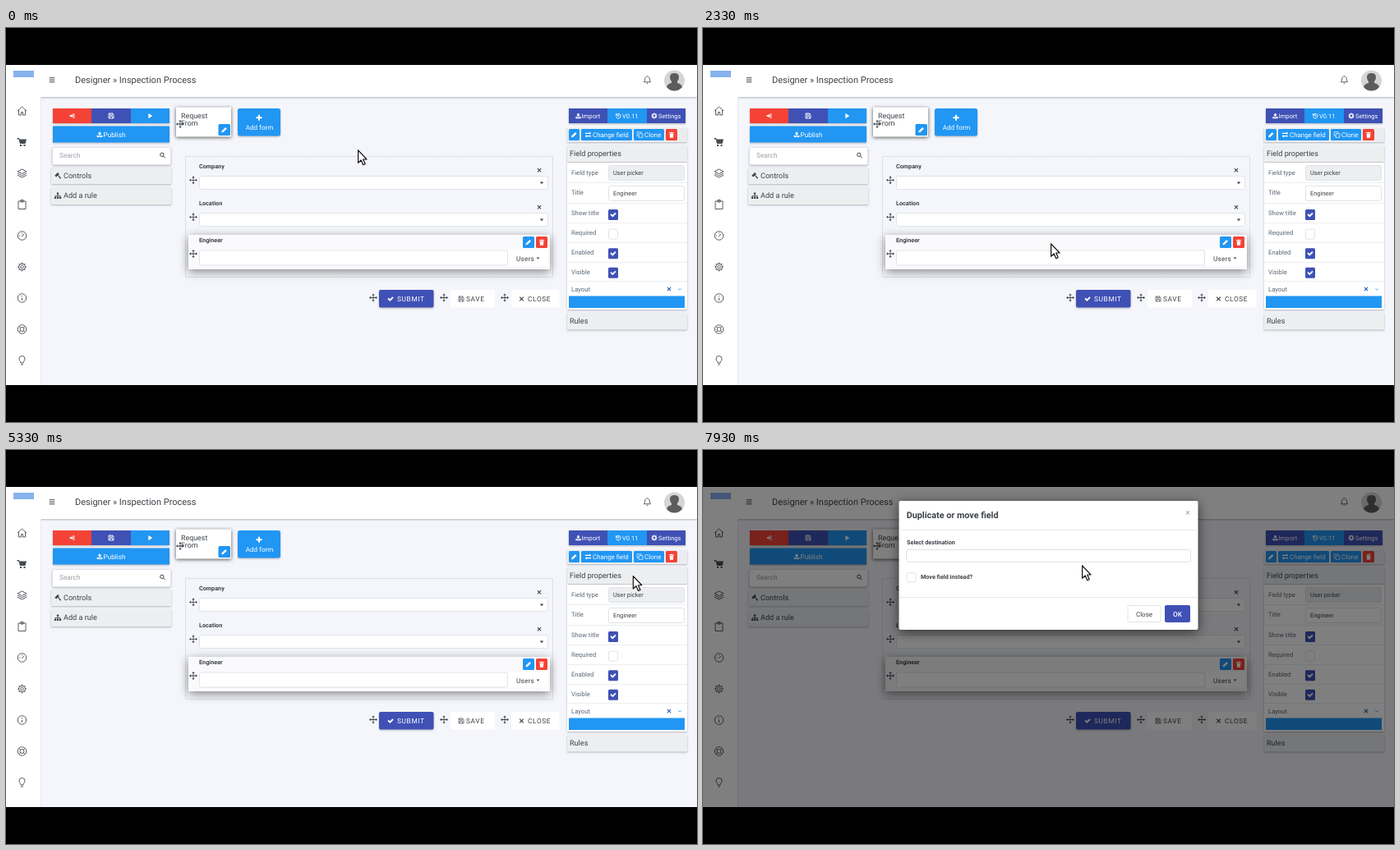
Recreate the animation shown at these times as an HTML page. Size 841 px wide and 480 px high, loop 8000 ms.

```html
<!DOCTYPE html>
<html lang="en">
<head>
<meta charset="utf-8">
<title>Form designer</title>
<style>
html, body { margin: 0; width: 100%; height: 100%; overflow: hidden; background: #000; }
svg { display: block; width: 841px; height: 480px; font-family: Roboto, sans-serif; text-rendering: geometricPrecision; }
text { white-space: pre; }
.low { filter: drop-shadow(0 1px 1px #0004); }
.mid { filter: drop-shadow(0 1px 2px #000a); }
.lift { filter: drop-shadow(0 3px 6px #0007); }
.hover { filter: drop-shadow(0 1px 1.5px #0007); }
.modal { filter: drop-shadow(0 3px 7px #0009); }
</style>
</head>
<body>
<svg id="stage" viewBox="0 0 841 480"></svg>
<script>
const BLUE = '#2196f3', INDIGO = '#3f51b5', RED = '#f44336', INK = '#3c4248', LABEL = '#596674', BAR = '#eceef0';
const ring = r => `M${12 + r} 12a${r} ${r} 0 1 1-${2 * r} 0a${r} ${r} 0 1 1 ${2 * r} 0`;
const teeth = 'M12 1v4M12 19v4M1 12h4M19 12h4M4 4l3 3M17 17l3 3M20 4l-3 3M7 17l-3 3';

// Icons live in a 24 x 24 box.
const solid = {
  menu: 'M2 3h20v3H2zM2 10.5h20v3H2zM2 18h20v3H2z',
  play: 'M5 2l16 10L5 22z',
  exit: 'M3 9h7V5l7 7-7 7v-4H3zM15 3h6v18h-6v-3h3V6h-3z',
  upload: 'M12 2l7 7h-4v7H9V9H5zM2 15h5v3h10v-3h5v7H2z',
  download: 'M9 2h6v6h4l-7 8-7-8h4zM2 15h5l5 4 5-4h5v7H2z',
  gavel: 'M12 1l5 5-10 10-5-5zM12 11l2-2 9 10-3 3z',
  tree: 'M9 2h6v6H9zM1 16h6v6H1zM9 16h6v6H9zM17 16h6v6h-6zM11 8h2v3h8v5h-2v-3h-6v3h-2v-3H5v3H3v-5h8z',
  move: 'M12 0l4 5h-3v6h6V8l5 4-5 4v-3h-6v6h3l-4 5-4-5h3v-6H5v3L0 12l5-4v3h6V5H8z',
  plus: 'M9.5 3h5v6.5H21v5h-6.5V21h-5v-6.5H3v-5h6.5z',
  pencil: 'M2 22l1-6L16 3l5 5L8 21z',
  cross: 'M5 2l7 7 7-7 3 3-7 7 7 7-3 3-7-7-7 7-3-3 7-7-7-7z',
  caret: 'M3 7h18l-9 11z',
  trash: 'M3 4h6V2h6v2h6v3H3zM5 8h14l-1 15H6z',
  check: 'M1 12l4-4 5 5L19 4l4 4-13 13z',
  swap: 'M1 5h16V1l6 6-6 5V9H1zM23 15H7v-3l-6 5 6 6v-4h16z',
  cart: 'M0 2h5l1 3h17l-3 11H7L4 5H0zM7 18h4v4H7zM16 18h4v4h-4z'
};
const line = {
  save: 'M3 3h14l4 4v14H3zM7 3v6h9V3M7 21v-8h10v8',
  search: 'M16.5 10a6.5 6.5 0 1 1-13 0a6.5 6.5 0 1 1 13 0M15 15l7 7',
  copy: 'M8 8h14v14H8zM8 16H2V2h14v6',
  history: 'M4 3v7h7M4.5 9a9 9 0 1 1-.5 6M12 7v6h4',
  cog: teeth + ring(6.5),
  chevron: 'M4 8l8 8 8-8',
  home: 'M1 12L12 2l11 10M4 10v12h6v-7h4v7h6V10',
  layers: 'M12 2l11 5.5-11 5.5L1 7.5zM1 12l11 5.5L23 12M1 16.5L12 22l11-5.5',
  clip: 'M3 4h18v19H3zM9 1h6v5H9z',
  gauge: ring(10.5) + 'M11 14l6-6M5 12h2M12 5v2',
  gear: teeth + ring(8) + ring(3.5),
  info: ring(10.5) + 'M12 11v7M12 6v2',
  life: ring(10.5) + ring(5) + 'M5 5l3.5 3.5M15.5 15.5L19 19M19 5l-3.5 3.5M8.5 15.5L5 19',
  bulb: 'M9 18c0-4-4-5-4-10a7 7 0 0 1 14 0c0 5-4 6-4 10zM9 22h6',
  bell: 'M3 18c4-3 1-10 5-13 2-3 6-3 8 0 4 3 1 10 5 13zM10 21.5h4'
};

const rect = (x, y, w, h, fill, more = '') => `<rect x="${x}" y="${y}" width="${w}" height="${h}" fill="${fill}" ${more}/>`;
const text = (x, y, s, size, fill = INK, more = '') => `<text x="${x}" y="${y}" font-size="${size}" fill="${fill}" ${more}>${s}</text>`;
const bold = (x, y, s, size = 7.25) => text(x, y, s, size, INK, 'font-weight="700"');
const icon = (name, cx, cy, size, color = INK, weight = 2) => {
  const k = size / 24;
  const paint = solid[name] ? `fill="${color}"` : `fill="none" stroke="${color}" stroke-width="${weight}"`;
  return `<path d="${solid[name] || line[name]}" transform="translate(${cx - size / 2} ${cy - size / 2}) scale(${k})" ${paint}/>`;
};
const group = (body, more = '') => `<g ${more}>${body}</g>`;
const field = (x, y, w, h, fill = '#fff') => rect(x + .5, y + .5, w - 1, h - 1, fill, 'rx="2" stroke="#e0e3e8"');
const bar = (x, y, w, h, s, tx = x + 3) => rect(x, y, w, h, BAR, 'class="low"') + text(tx, y + 13.2, s, 9.1);
const tool = (name, x, y, w, h, color, size = 8) => rect(x, y, w, h, color, 'rx="1.5"') + icon(name, x + w / 2, y + h / 2, size, '#fff', 3);
const tick = (y, on) => on
  ? rect(733, y, 12, 13, INDIGO, 'rx="1.5"') + icon('check', 739, y + 6.5, 8, '#fff')
  : field(733, y, 12, 13);
const divider = y => rect(683, y, 146, 1, '#eceef1');

function dropdown(y, label, id) {
  return bold(235, y, label) + icon('cross', 649, y + 2.3, 6) + icon('move', 228, y + 14.3, 10) +
    field(235, y + 9, 425, 17) + rect(235, y + 9, 425, 17, '#fff', `rx="2" class="hover" id="${id}"`) +
    icon('caret', 652, y + 17.7, 6);
}
function engineer(y) {
  return field(235, y, 376, 19) + rect(611, y, 49, 19, '#fff') +
    text(621, y + 13, 'Users', 8.2, INK, 'letter-spacing=".2"') + icon('caret', 647.5, y + 10, 5);
}
function actions(y) {
  const label = (x, s, fill) => text(x, y + 13.7, s, 8.4, fill, 'letter-spacing=".6"');
  return [447, 533, 607].map(x => icon('move', x, y + 9.5, 10)).join('') +
    rect(454, y, 66.5, 21.5, INDIGO, 'rx="2" class="low"') + icon('check', 468, y + 11, 8, '#fff') + label(476, 'SUBMIT', '#fff') +
    rect(541, y, 54, 21.5, '#fff', 'rx="2"') + icon('save', 554, y + 11, 8) + label(560, 'SAVE', INK) +
    rect(615, y, 58.5, 21.5, '#fff', 'rx="2"') + icon('cross', 627.5, y + 11, 6.5) + label(635, 'CLOSE', INK);
}
const outline = h => rect(218.5, 156.5, 447, h, 'none', 'stroke="#cdd1d8" stroke-dasharray="1.5 1"');
const clone = x => rect(x, 123, 37, 14, BLUE, 'rx="1.5"') + icon('copy', x + 7.5, 130, 8, '#fff') + text(x + 13, 132.8, 'Clone', 8, '#fff');

const page =
  rect(0, 45, 841, 390, '#f5f6fb') +
  rect(0, 45, 841, 39, '#fff', 'class="low"') + rect(0, 84, 42, 351, '#fff') + rect(42, 84, 1, 351, '#e6e8ee') +
  rect(9, 52, 25, 8, '#86b2ee') +
  icon('menu', 56, 63.3, 8) + text(84, 66.6, 'Designer » Inspection Process', 11) +
  icon('bell', 780.5, 63, 11, INK, 1.8) +
  '<circle cx="813.5" cy="64" r="12.5" fill="#d5d5d5"/><path d="M804 72q1-4 6-5v-2q-2-2-2-5 0-5 5.500-5t5.500 5q0 3-2 5v2q5 1 6 5-4 4.500-9.500 4.500T804 72z" fill="#5c5c5c"/>' +
  ['home', 'cart', 'layers', 'clip', 'gauge', 'gear', 'info', 'life', 'bulb']
    .map((name, i) => icon(name, 19.5, 101 + i * 38, 12, '#454b52', 1.8)).join('') +
  group(rect(57, 98, 47, 18, RED) + rect(104, 98, 48, 18, INDIGO) + rect(152, 98, 47, 18, BLUE) + rect(57, 119.5, 142, 20, BLUE), 'class="low"') +
  icon('exit', 80.5, 107, 7.5, '#fff') + icon('save', 128, 107, 8, '#fff', 2.6) + icon('play', 175.5, 107, 7.500, '#fff') +
  icon('upload', 114, 129.7, 8, '#fff') + text(118.5, 132.6, 'Publish', 8.2, '#fff') +
  group(field(56, 145, 145, 22), 'class="low"') + text(65, 158.4, 'Search', 8.3, '#9a9fa6') + icon('search', 190.5, 155, 8, INK, 3) +
  bar(55, 170, 146, 20, 'Controls', 70) + icon('gavel', 63, 180, 9) +
  bar(55, 194, 146, 21, 'Add a rule', 70) + icon('tree', 63, 204.3, 9) +
  rect(207, 96.5, 67, 36, '#fff', 'class="mid"') + text(213, 109.7, 'Request', 8.9) + text(213, 119.4, 'From', 8.9) +
  icon('move', 212, 117, 10) + tool('pencil', 258.5, 117, 14.5, 14, BLUE) +
  rect(282, 98, 52, 33.5, BLUE, 'rx="2.5" class="low"') + icon('plus', 308, 109.3, 9.5, '#fff') +
  text(308.5, 123.8, 'Add form', 8.1, '#fff', 'text-anchor="middle"') +
  dropdown(171, 'Company', 'hover0') + dropdown(216, 'Location', 'hover1') +
  group(rect(685, 98, 47, 18, INDIGO) + rect(732, 98, 48, 18, BLUE) + rect(780, 98, 47, 18, INDIGO), 'class="low"') +
  icon('download', 696.5, 107, 7.5, '#fff') + text(700.5, 109.8, 'Import', 7.7, '#fff') +
  icon('history', 745, 107, 7.5, '#fff', 3) + text(750, 109.8, 'V0.11', 7.5, '#fff') +
  icon('cog', 789, 107, 7.5, '#fff', 4) + text(794, 109.8, 'Settings', 7.5, '#fff') +
  rect(683, 122, 146, 17, '#eaecef', 'class="low"') + tool('pencil', 685, 123, 13, 14, BLUE);

const rowLabel = (y, s) => text(688, y, s, 7.7, LABEL);
const entry = (y, s, fill) => field(733, y, 93, 19, fill) + text(739, y + 12.3, s, 7.4);

const formView =
  outline(144) + rect(222, 252, 440, 42, '#fafafc', 'class="lift" id="ghost"') +
  bold(235, 260.7, 'Engineer') + icon('move', 228, 275, 10) + engineer(268) +
  rect(235, 268, 376, 18.5, '#fff', 'rx="2" class="hover" id="hover2"') + actions(316.5) +
  clone(701) + tool('trash', 740, 123, 14, 14, RED) + bar(683, 143, 146, 20, 'Form properties') +
  rect(683, 164, 146, 72, '#fff', 'class="low"') + divider(188) + divider(213) +
  rowLabel(178.7, 'Title') + entry(167, 'Request From') +
  rowLabel(203.2, 'Visible') + tick(196, true) + rowLabel(227.3, 'Show info') + tick(220, false) +
  bar(683, 240, 146, 21, 'Form submit rules');

const fieldView =
  outline(147) + rect(222, 252, 440, 42, '#fafafc', 'class="lift"') +
  bold(235, 260.7, 'Engineer') + icon('move', 228, 275, 10) + engineer(270.5) +
  tool('pencil', 629, 254, 14, 14, BLUE) + tool('trash', 645, 254, 14, 14, RED) + actions(319) +
  rect(700, 123, 62, 14, BLUE, 'rx="1.5"') + icon('swap', 708.5, 130, 8, '#fff') + text(714, 132.8, 'Change field', 7.9, '#fff') +
  rect(764, 123, 37, 14, BLUE, 'rx="1.5" class="mid" id="hover3"') + clone(764) +
  tool('trash', 803, 123, 14, 14, RED) + bar(683, 143, 146, 20, 'Field properties') +
  rect(683, 164, 146, 179, '#fff', 'class="low"') + [188, 213, 237, 261, 285, 308].map(divider).join('') +
  rowLabel(178.7, 'Field type') + entry(167, 'User picker', '#eceef0') + rowLabel(203.4, 'Title') + entry(192, 'Engineer') +
  ['Show title', 'Required', 'Enabled', 'Visible'].map((s, i) => rowLabel(228.4 + i * 23.7, s) + tick(221 + i * 23.6, i !== 1)).join('') +
  rowLabel(321.3, 'Layout') + icon('cross', 807, 318, 6, '#1565b0') + icon('chevron', 820, 318.3, 5, BLUE, 4) +
  rect(685, 326.5, 141, 14.5, BLUE) + bar(683, 347, 146, 20.5, 'Rules');

const dialog =
  rect(0, 45, 841, 390, '#000', 'opacity=".5"') + rect(238.5, 62, 364, 157, '#fff', 'rx="2" class="modal"') +
  bold(247.7, 82.8, 'Duplicate or move field', 10.8) + text(590, 80, '×', 11, '#a5a5a5', 'text-anchor="middle"') +
  rect(238.5, 97, 364, 1, '#e8e8e8') + bold(248, 115, 'Select destination') + field(247, 121, 347, 16) +
  field(247.5, 149, 12, 12.5) + bold(265, 157.2, 'Move field instead?', 7.2) + rect(238.5, 179, 364, 1, '#e8e8e8') +
  field(516.5, 189, 41, 21) + text(537, 202.7, 'Close', 8, INK, 'text-anchor="middle"') +
  rect(562, 189, 31, 21, INDIGO, 'rx="2"') + text(577.5, 202.7, 'OK', 8.2, '#fff', 'text-anchor="middle" font-weight="500"');

const pointer = d => `<path d="${d}" fill="#fff" stroke="#111" stroke-width="1.2" stroke-linejoin="round"/>`;
const arrow = pointer('M.6.8V16.300L4.200 13 6.800 18.800 9.200 17.700 6.700 12H11z');
const hand = pointer('M-1.800 1.500Q0-1 1.800 1.500V8Q4 7 5 8.700 7 8 8 9.700 10 9.500 10 12V16Q10 18 8.500 20V22H-1.500V20L-5.500 14.500Q-6.500 12-4 12L-1.800 14z') +
  '<path d="M1.800 8v4M5 9v3.500M8 10v3" stroke="#111" stroke-width=".9"/>';

const $ = id => document.getElementById(id);
$('stage').innerHTML = page + group(formView, 'id="form"') + group(fieldView, 'id="field"') + group(dialog, 'id="dialog"') +
  group(group(arrow, 'id="arrow"') + group(hand, 'id="hand"'), 'id="cursor"');

const moves = [[600, 1400, 428, 148, 417, 271], [1460, 2000, 417, 271, 423, 262], [2800, 3750, 423, 262, 633, 263],
  [4660, 5550, 633, 263, 786, 133], [6700, 7930, 786, 133, 461, 140]];
const targets = [[235, 180, 425, 17], [235, 225, 425, 17], [235, 268, 376, 19], [764, 123, 37, 14]];
const clamp = v => Math.max(0, Math.min(1, v));

function cursorAt(t) {
  const [from, to, x0, y0, x1, y1] = moves.findLast(m => t >= m[0]) || moves[0];
  const p = clamp((t - from) / (to - from)), e = p * p * (3 - 2 * p);
  return [x0 + (x1 - x0) * e, y0 + (y1 - y0) * e];
}
const inside = ([px, py], [x, y, w, h]) => px >= x && px <= x + w && py >= y && py <= y + h;
// A hover shadow fades in and out over 200 ms.
function hoverLevel(t, box) {
  let level = 0;
  for (let i = 0; i < 10; i++) level += inside(cursorAt(t - i * 20), box) / 10;
  return level;
}
const show = (id, on) => $(id).setAttribute('display', on ? 'inline' : 'none');

function draw() {
  const t = performance.now() % 8000, selected = t < 60 || t >= 2330, open = t >= 6530;
  const at = cursorAt(t);
  const pointing = selected && t < 6760 && (inside(at, targets[3]) || inside(at, [629, 254, 14, 14]));
  show('form', !selected);
  show('field', selected);
  show('dialog', open);
  show('arrow', !pointing);
  show('hand', pointing);
  $('ghost').setAttribute('opacity', clamp((460 - t) / 400));
  targets.forEach((box, i) => $('hover' + i).setAttribute('opacity', open ? 0 : hoverLevel(t, box)));
  $('cursor').setAttribute('transform', `translate(${at})`);
  requestAnimationFrame(draw);
}
draw();
</script>
</body>
</html>
```
